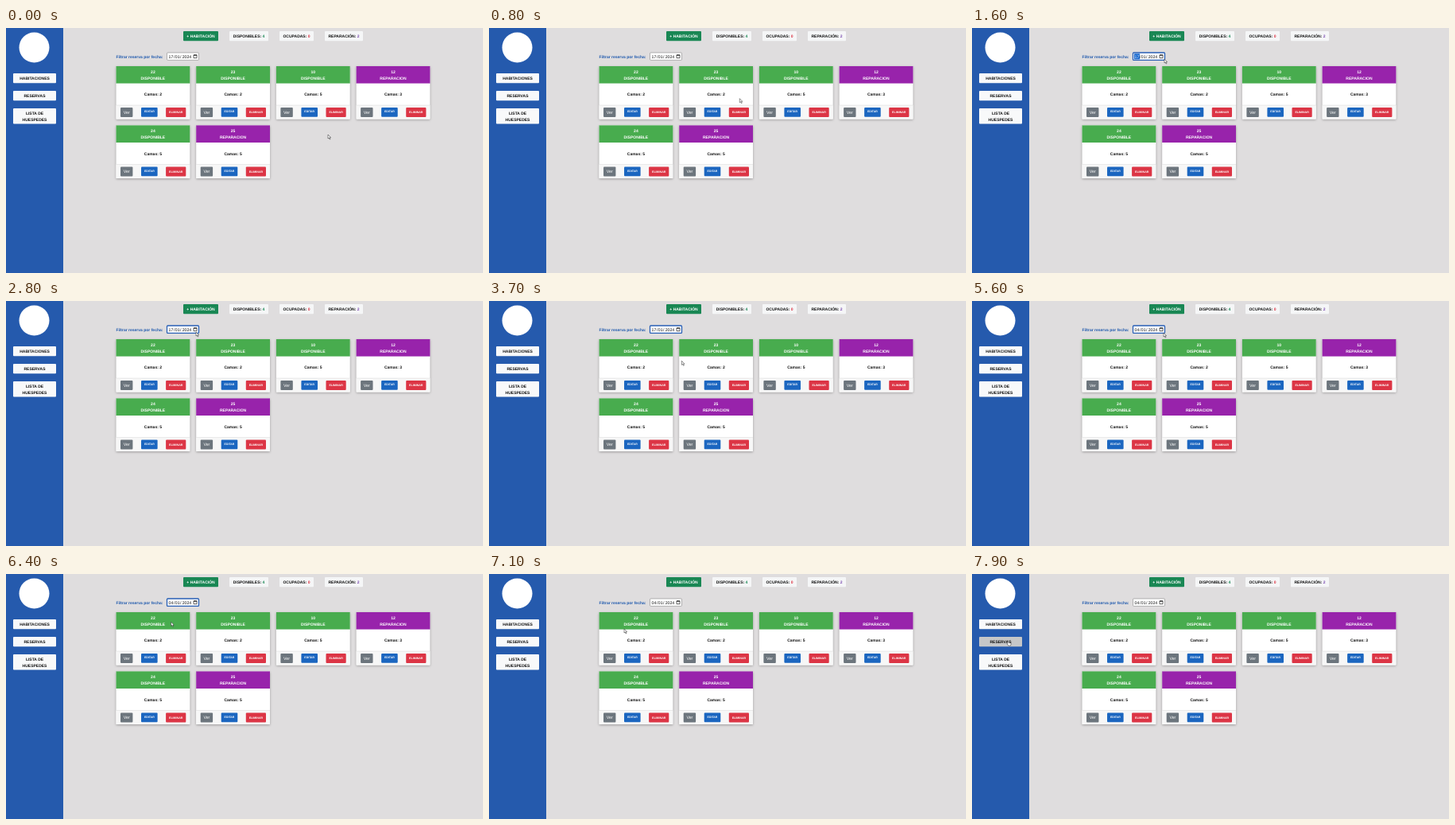
An HTML page that plays this animation: 600 px wide and 308 px high, repeating every 8 s.

```html
<!DOCTYPE html>
<html lang="es">
<head>
<meta charset="utf-8">
<title>Reservas</title>
<style>
html, body { margin: 0; width: 100%; height: 100%; overflow: hidden; background: #dfddde; }
svg { display: block; }
text { font: bold 5px "Liberation Sans", Arial, sans-serif; text-rendering: geometricPrecision; white-space: pre; }
.shadow { filter: drop-shadow(0 1px 1.5px rgba(0, 0, 0, .3)); }
</style>
</head>
<body>
<svg id="stage" width="600" height="308" viewBox="0 0 600 308"></svg>
<script>
const LOOP = 8000;
const stage = document.getElementById('stage');
const INK = '#111', GREEN = '#48ac4e', PURPLE = '#9823ab';

const box = (x, y, w, h, fill, extra = '') =>
  `<rect x="${x}" y="${y}" width="${w}" height="${h}" fill="${fill}" ${extra}/>`;
const label = (x, y, str, fill = INK, style = '', anchor = 'middle') =>
  `<text x="${x}" y="${y}" fill="${fill}" text-anchor="${anchor}" style="${style}">${str}</text>`;

function sidebar() {
  const item = (y, h, lines, id) =>
    box(9, y, 54, h, '#f8f9fa', `rx="1" id="${id}"`) +
    lines.map((s, i) => label(36, y + 7.9 + i * 7.6, s)).join('');
  return box(0, 0, 72, 308, '#255aad') +
    '<circle cx="35.5" cy="24.5" r="19" fill="#fff"/>' +
    item(57, 12.3, ['HABITACIONES'], 'rooms') +
    item(79, 12.2, ['RESERVAS'], 'bookings') +
    item(101, 19.4, ['LISTA DE', 'HUESPEDES'], 'guests');
}

function counter(x, w, name, n, color) {
  return box(x, 4, w, 12.2, '#f5f6f7', 'rx="1"') +
    label(x + w / 2, 11.9, `${name}: <tspan fill="${color}">${n}</tspan>`);
}

function card(col, row, room, beds, free) {
  const button = (x, w, h, fill, str, y, style) =>
    box(x, 52, w, h, fill, 'rx="1"') + label(x + w / 2, y, str, '#fff', style);
  return `<g transform="translate(${138.5 + col * 100.7} ${48 + row * 74.4})">
    <g class="shadow">${box(0, 0, 92.8, 66.6, '#fff', 'rx="1"')}</g>
    ${box(0, 0, 92.8, 21.6, free ? GREEN : PURPLE)}
    ${box(0, 49, 92.8, 17.6, '#f7f7f7')}
    ${box(0, 48.8, 92.8, .5, '#d8d8d8')}
    ${label(46.4, 8.7, room, '#fff')}
    ${label(46.4, 17, free ? 'DISPONIBLE' : 'REPARACION', '#fff')}
    ${label(46.4, 37.3, 'Camas: ' + beds)}
    ${button(5.5, 15.4, 12, '#6c757d', 'Ver', 60, 'font-weight:400;font-size:5.3px')}
    ${button(31.5, 20.6, 11.8, '#1b66c0', 'EDITAR', 58.3, 'font-size:3.5px')}
    ${button(62.6, 25.2, 12, '#dc3545', 'ELIMINAR', 59.2, 'font-size:3.6px')}
  </g>`;
}

function dateField() {
  const part = (x, str, id = '') =>
    label(x, 38, `<tspan id="${id}">${str}</tspan>`, INK, 'font-weight:400;font-size:5.2px');
  return label(138.5, 37.6, 'Filtrar reserva por fecha:', '#1f59ad', '', 'start') +
    box(202.5, 31, 40, 9.4, '#fff', 'rx="1" id="field"') +
    box(204, 32.3, 7, 7, '#1768cf', 'id="mark"') +
    part(207.5, '', 'day') + part(211.8, '/') + part(215.7, '01') +
    part(219.8, '/') + part(227.5, '2024') +
    '<path d="M236 34h4v3.7h-4zM236 34.4h4M237 33v1M239 33v1" fill="none" stroke="#222" stroke-width=".7"/>';
}

stage.innerHTML = box(0, 0, 600, 308, '#dfddde') + sidebar() +
  box(223, 4, 44, 12.2, '#198754', 'rx="1"') + label(245, 11.9, '+ HABITACIÓN', '#fff') +
  counter(281, 49, 'DISPONIBLES', 4, '#198754') +
  counter(344, 43, 'OCUPADAS', 0, '#dc3545') +
  counter(401, 48, 'REPARACIÓN', 2, '#7b4bb0') +
  dateField() +
  card(0, 0, 22, 2, true) + card(1, 0, 23, 2, true) +
  card(2, 0, 10, 5, true) + card(3, 0, 12, 3, false) +
  card(0, 1, 24, 5, true) + card(1, 1, 25, 5, false) +
  `<g id="cursor" stroke="#222" stroke-width=".5" stroke-linejoin="round" fill="#fff">
    <path id="arrow" d="M0 0V5L1.2 4L2.1 6L3 5.6L2.1 3.7H3.6Z"/>
    <path id="hand" d="M0 .4Q.6-.3 1.1.4V2.3L3.7 2.9Q4.3 3.2 4.1 4.2L3.5 6H.8L-1 3.7Q-.8 3 0 3.5Z"/>
  </g>`;

// Pointer stops: time, x, y
const path = [
  [0, 405, 134], [200, 405, 134], [900, 310, 86], [1400, 242, 39], [1900, 242, 39],
  [2300, 239, 39], [3100, 239, 39], [3900, 243, 82], [4800, 243, 82],
  [5400, 241, 40], [5900, 241, 40], [6500, 205, 62], [7000, 170, 69],
  [7300, 170, 69], [7800, 45, 84], [LOOP, 45, 84]
];

function pointer(t) {
  const i = path.findIndex(p => p[0] > t);
  const [t0, x0, y0] = path[i - 1], [t1, x1, y1] = path[i];
  const u = (t - t0) / (t1 - t0), k = u * u * (3 - 2 * u);
  return [x0 + (x1 - x0) * k, y0 + (y1 - y0) * k];
}

const $ = id => document.getElementById(id);
const set = (id, attrs) => {
  for (const key in attrs) $(id).setAttribute(key, attrs[key]);
};

function draw(now) {
  const t = Math.floor(now % LOOP / 100) * 100;
  const [x, y] = pointer(t);
  const focused = t >= 1500 && t < 6500;
  const selected = t >= 1500 && t < 2000;
  const hover = x >= 9 && x <= 63 && y >= 79 && y <= 91;

  set('field', { stroke: focused ? '#285fb5' : '#858585', 'stroke-width': focused ? 1.3 : .6 });
  set('mark', { opacity: +selected });
  set('day', { fill: selected ? '#fff' : INK });
  $('day').textContent = t < 5000 ? '17' : '04';
  set('bookings', { fill: hover ? '#c6c7c8' : '#f8f9fa' });
  set('arrow', { opacity: +!hover });
  set('hand', { opacity: +hover });
  set('cursor', { transform: `translate(${x} ${y})` });
  requestAnimationFrame(loop);
}

const start = performance.now();
const loop = () => draw(performance.now() - start);
loop();
</script>
</body>
</html>
```
